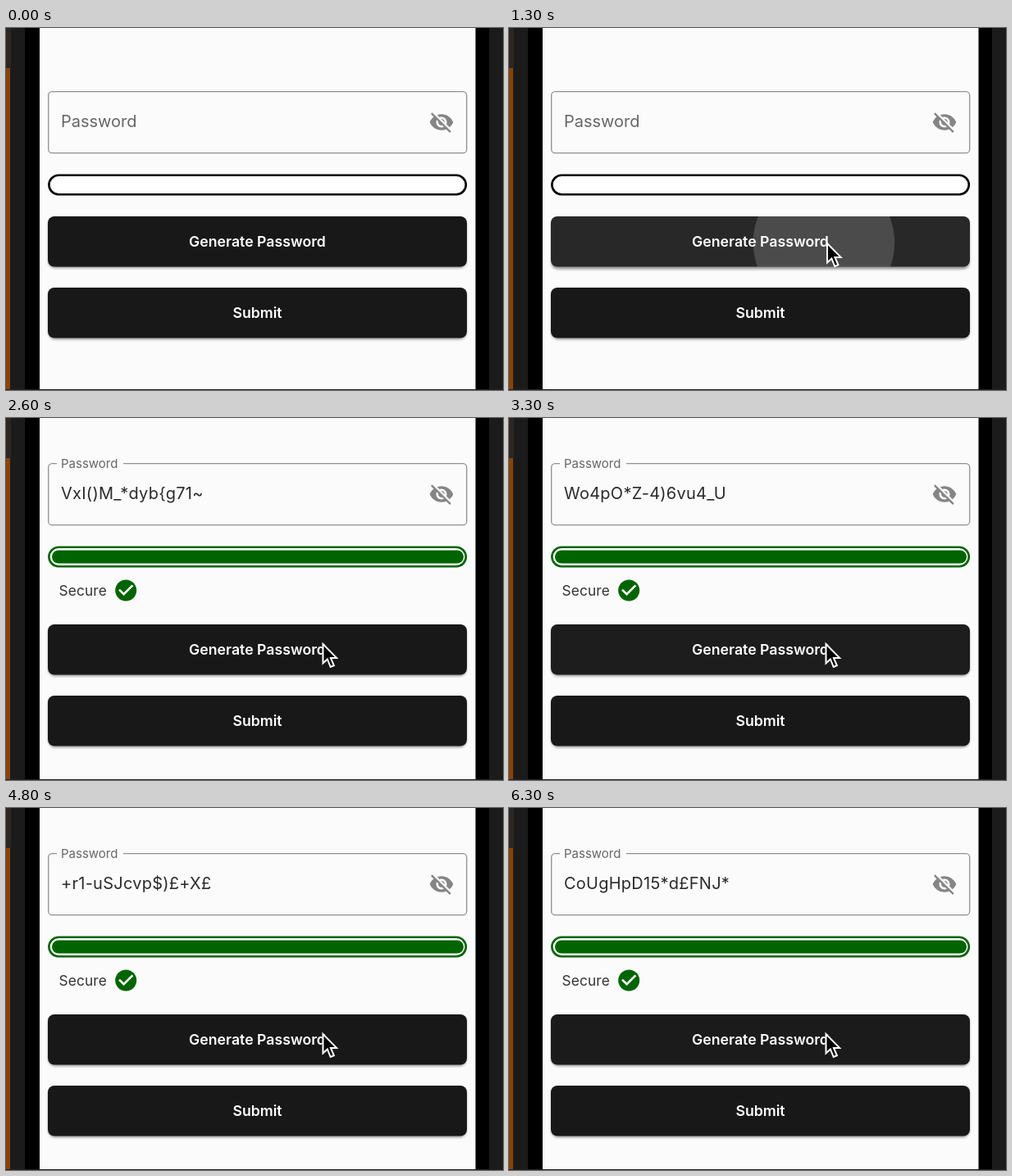
Animation, 606 px wide and 442 px high, one loop 7100 ms. Source, as an HTML page:

```html
<!DOCTYPE html>
<html lang="en">
<head>
<meta charset="utf-8">
<title>Password generator</title>
<style>
  html, body { margin: 0; width: 100%; height: 100%; overflow: hidden; background: #000; }
  svg { display: block; width: 606px; height: 442px; font-family: Inter, Roboto, sans-serif; }
  .button { fill: #181818; }
  .caption { fill: #fff; font-size: 17.7px; font-weight: 600; text-anchor: middle; }
  #value { fill: #2b2b2b; font-size: 20px; letter-spacing: .25px; white-space: pre; }
  #label { fill: #666; font-size: 20px; }
</style>
</head>
<body>
<svg viewBox="0 0 606 442">
  <defs>
    <clipPath id="clip"><rect x="51" y="230" width="511" height="61.5" rx="8"/></clipPath>
    <filter id="blur" x="-5%" y="-30%" width="110%" height="160%"><feGaussianBlur stdDeviation="1.4"/></filter>
  </defs>

  <!-- Phone body and screen -->
  <rect width="606" height="442" fill="#1b1b1b"/>
  <rect width="6" height="49" fill="#2b2725"/>
  <rect y="49" width="5" height="393" fill="#8b4207"/>
  <rect x="23" width="566" height="442"/>
  <rect x="41" width="531.5" height="442" fill="#fbfbfb"/>
  <rect y="441" width="606" height="1" fill="#222"/>

  <g id="top">
    <rect x="51.7" y="77.7" width="510" height="75" rx="4.5" fill="none" stroke="#909090" stroke-width="1.3"/>
    <rect id="notch" x="62" y="76" height="4" fill="#fbfbfb"/>
    <text id="label">Password</text>
    <text id="value" x="67" y="121.3"></text>
    <path transform="translate(515.4 99.4) scale(1.3)" fill="#858585" d="M12 7c2.76 0 5 2.24 5 5 0 .65-.13 1.26-.36 1.83l2.92 2.92c1.51-1.26 2.7-2.89 3.43-4.75-1.73-4.39-6-7.5-11-7.5-1.4 0-2.74.25-3.98.7l2.16 2.16C10.74 7.13 11.35 7 12 7zM2 4.27l2.28 2.28.46.46C3.08 8.3 1.78 10.02 1 12c1.73 4.39 6 7.5 11 7.5 1.55 0 3.03-.3 4.38-.84l.42.42L19.73 22 21 20.73 3.27 3 2 4.27zM7.53 9.8l1.55 1.55c-.05.21-.08.43-.08.65 0 1.66 1.34 3 3 3 .22 0 .44-.03.65-.08l1.55 1.55c-.67.33-1.41.53-2.2.53-2.76 0-5-2.24-5-5 0-.79.2-1.53.53-2.2zm4.31-.78l3.15 3.15.02-.16c0-1.66-1.34-3-3-3l-.17.01z"/>
    <rect id="frame" x="52.4" y="179.8" width="508.4" height="23.4" rx="11.7" fill="#fff" stroke-width="2.6"/>
    <rect id="bar" x="56" y="183.5" height="16" rx="8"/>
    <g id="secure">
      <text x="64.5" y="238.8" fill="#333" font-size="17.3" letter-spacing=".15">Secure</text>
      <circle cx="146.2" cy="232.5" r="13" fill="#006400"/>
      <path transform="translate(130.6 216.9) scale(1.3)" fill="#fff" d="M10 17l-5-5 1.41-1.41L10 14.17l7.59-7.59L19 8z"/>
    </g>
  </g>

  <g id="bottom">
    <rect id="shadow" x="51.5" width="510" height="61.5" rx="8" filter="url(#blur)"/>
    <rect class="button" x="51" y="230" width="511" height="61.5" rx="8"/>
    <g clip-path="url(#clip)" fill="#fff">
      <rect id="tint" x="51" y="230" width="511" height="62"/>
      <circle id="ripple"/>
    </g>
    <text class="caption" x="306.5" y="266.6">Generate Password</text>
    <rect x="51.5" y="318.7" width="510" height="61.5" rx="8" opacity=".4" filter="url(#blur)"/>
    <rect class="button" x="51" y="317" width="511" height="61.5" rx="8"/>
    <text class="caption" x="306.5" y="353.8">Submit</text>
  </g>

  <path id="cursor" d="M0 0V23.5L5.4 18.4L9.2 28L13.4 26.3L9.4 16.9H16.6Z" stroke="#fff" stroke-width="2"/>
</svg>
<script>
const LOOP = 7100, STEP = 100, HOLD = 150, FADE = 375;
const presses = [1200, 2820, 4180, 5801];
const passwords = ["VxI()M_*dyb{g71~", "Wo4pO*Z-4)6vu4_U", "+r1-uSJcvp$)£+X£", "CoUgHpD15*d£FNJ*"];

const $ = id => document.getElementById(id);
const set = (id, attrs) => {
  for (const key in attrs) $(id).setAttribute(key, attrs[key]);
};
const ramp = (t, from, to) => Math.min(1, Math.max(0, (t - from) / (to - from)));
const mix = (a, b, k) => a + (b - a) * k;
const smooth = k => k * k * (3 - 2 * k);

function cursorAt(t) {
  const enter = smooth(ramp(t, 300, 1100));
  const settle = smooth(ramp(t, 2200, 2600));
  return [mix(mix(532, 388, enter), 386.5, settle), mix(mix(28, 263, enter), 276, settle)];
}

function drawButton(t, shift, x, y) {
  const start = presses.findLast(p => p <= t) ?? Infinity;
  const age = t - start;
  const pressed = age >= 0 && age < HOLD;
  const hover = t < 1400 && y > 230;
  // The ripple creeps while held, then rushes out to fill the button.
  const grow = age < HOLD ? .05 * age / 100 : mix(.075, 1, smooth(ramp(age, HOLD, HOLD + 225)));
  const alpha = age >= 0 ? .16 * ramp(age, -25, 75) * (1 - ramp(age, HOLD, HOLD + FADE)) : 0;
  set("tint", { opacity: hover || pressed ? .07 : 0 });
  set("shadow", { y: hover || pressed ? 233 : 231.7, opacity: .4 });
  set("ripple", {
    cx: age >= 0 ? mix(x, 306.5, grow) : x,
    cy: mix(y - shift, 260.7, age >= 0 ? Math.min(1, grow + .4) : 0),
    r: age >= 0 ? mix(77, 262, grow) : 0,
    opacity: alpha
  });
}

function draw(now) {
  const t = Math.floor(now % LOOP / STEP) * STEP;
  const count = presses.filter(p => t >= p + 170).length;
  const filled = count > 0;
  const shift = filled ? 22 : 0;
  const float = filled ? smooth(ramp(t, 1330, 1530)) : 0;
  const level = ramp(t, 1310, 1810);
  const [x, y] = cursorAt(t);

  set("top", { transform: `translate(0 ${-shift})` });
  set("bottom", { transform: `translate(0 ${shift})` });
  set("label", { transform: `translate(67 ${mix(121.3, 83.3, float)}) scale(${mix(1, .75, float)})` });
  set("notch", { width: 81 * float });
  $("value").textContent = filled ? passwords[count - 1] : "";
  set("secure", { visibility: filled ? "visible" : "hidden" });
  set("frame", { stroke: `rgb(0 ${Math.round(100 * level)} 0)` });
  set("bar", { width: 502 * level, fill: `rgb(0 100 0 / ${level})` });
  drawButton(t, shift, x, y);
  set("cursor", { transform: `translate(${x} ${y})`, visibility: t < 400 ? "hidden" : "visible" });
}

const begin = performance.now();
function tick() {
  draw(performance.now() - begin);
  requestAnimationFrame(tick);
}
tick();
</script>
</body>
</html>
```
